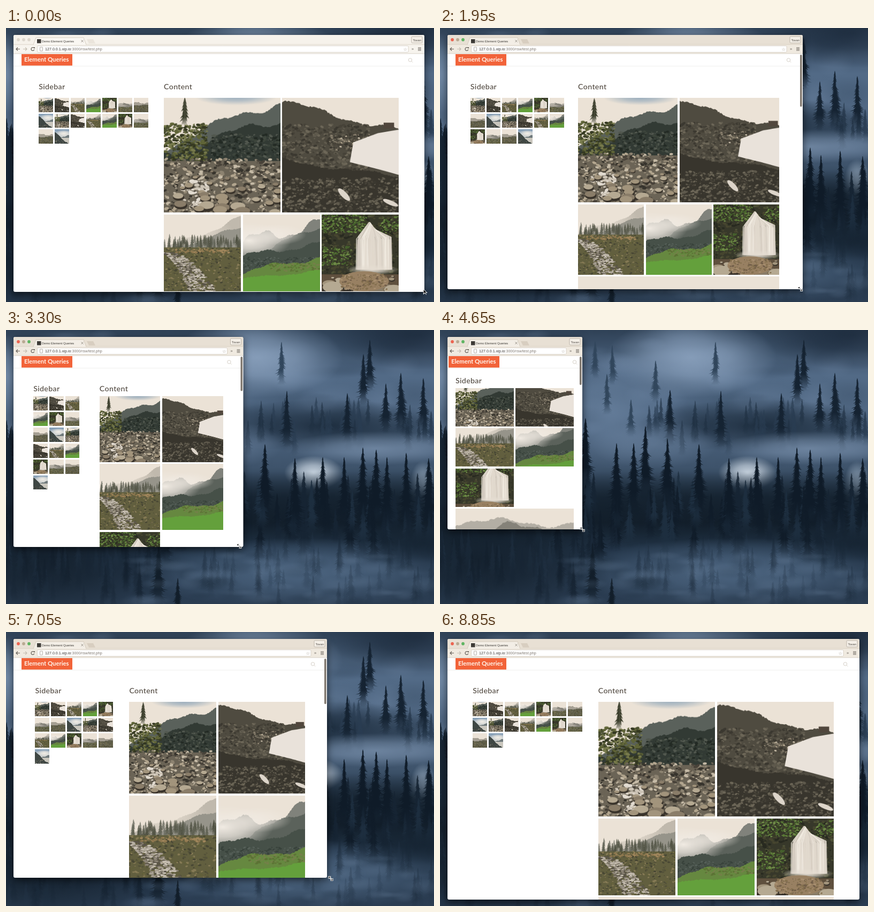
An HTML page with a canvas that plays this animation: 800 px wide and 514 px high, repeating every 9000 ms.

```html
<!DOCTYPE html>
<html lang="en">
<head>
<meta charset="utf-8">
<title>Element Queries</title>
<style>
html, body { margin: 0; width: 800px; height: 514px; overflow: hidden; background: #1b2a3a; }
canvas { display: block; }
</style>
</head>
<body>
<canvas id="stage" width="800" height="514"></canvas>
<script>
const ctx = document.getElementById('stage').getContext('2d');
const LOOP = 9000, STEP = 150;
const SANS = '"Liberation Sans", Arial, sans-serif', LATO = 'Lato, sans-serif';

let seed = 7;
const rnd = (a = 0, b = 1) => a + (b - a) * (seed = seed * 16807 % 2147483647) / 2147483647;
const pick = list => list[Math.floor(rnd(0, list.length))];

function offscreen(w, h, scale, paint) {
  const c = document.createElement('canvas');
  c.width = w;
  c.height = h;
  const g = c.getContext('2d');
  g.scale(scale, scale);
  paint(g);
  return c;
}

function rect(g, color, x, y, w, h) {
  g.fillStyle = color;
  g.fillRect(x, y, w, h);
}

function poly(g, color, ...p) {
  g.fillStyle = color;
  g.beginPath();
  for (let i = 0; i < p.length; i += 2) g.lineTo(p[i], p[i + 1]);
  g.fill();
}

function blob(g, color, x, y, rx, ry, turn = 0) {
  g.fillStyle = color;
  g.beginPath();
  g.ellipse(x, y, rx, ry, turn, 0, 7);
  g.fill();
}

function specks(g, colors, n, x0, y0, x1, y1, size) {
  for (let i = 0; i < n; i++) {
    const s = size * rnd(.3, 1);
    blob(g, pick(colors), rnd(x0, x1), rnd(y0, y1), s, s * .6, rnd(-.6, .6));
  }
}

function glow(g, color, x, y, rx, ry, alpha) {
  g.save();
  g.translate(x, y);
  g.scale(rx, ry);
  g.globalAlpha = alpha;
  const fill = g.createRadialGradient(0, 0, 0, 0, 0, 1);
  fill.addColorStop(0, color);
  fill.addColorStop(.45, color + 'b0');
  fill.addColorStop(1, color + '00');
  rect(g, fill, -1, -1, 2, 2);
  g.restore();
}

// Evenly spaced colours from top to bottom
function vertical(g, y, h, ...colors) {
  const fill = g.createLinearGradient(0, y, 0, y + h);
  colors.forEach((color, i) => fill.addColorStop(i / (colors.length - 1), color));
  return fill;
}

// A ragged fir whose foot dissolves into the mist
function fir(g, x, top, h, color) {
  g.fillStyle = vertical(g, top, h, color, color, color, color + '00');
  for (const side of [-1, 1]) {
    g.beginPath();
    g.moveTo(x, top);
    for (let y = 2; y < h; y += 3) {
      const reach = side * (.8 + .19 * Math.min(y, h * .7) * rnd(.35, 1.15));
      g.lineTo(x + reach, top + y + 1.5);
      g.lineTo(x + reach * .4, top + y);
    }
    g.lineTo(x, top + h);
    g.fill();
  }
}

function firs(g, n, x0, x1, top, spread, h, colors, alpha = 1) {
  g.globalAlpha = alpha;
  for (let i = 0; i < n; i++) {
    const size = rnd(.7, 1.2);
    fir(g, rnd(x0, x1), top + rnd(0, spread), h * size, pick(colors));
  }
  g.globalAlpha = 1;
}

const forest = offscreen(800, 514, 1, g => {
  const dark = ['#101c29', '#162433', '#1d2e3f'];
  const stand = (color, h, spots) => spots.forEach(([x, y]) => fir(g, x, y, h * rnd(.9, 1.1), color));
  rect(g, vertical(g, 0, 514, '#2f4156', '#526a86', '#4f6681', '#3e536b', '#1a2a39', '#24364a', '#2b3d52'), 0, 0, 800, 514);
  for (let i = 0; i < 90; i++)
    glow(g, pick(['#7088a6', '#31455b']), rnd(0, 800), rnd(0, 220), rnd(25, 80), rnd(12, 35), .25);
  glow(g, '#8da4c0', 470, 52, 160, 75, .85);
  glow(g, '#6d86a4', 320, 150, 110, 110, .65);
  glow(g, '#7890ac', 0, 85, 45, 75, .75);
  glow(g, '#1a2839', 770, 10, 170, 65, .8);
  stand('#31465c', 75, [[290, 20], [322, 28], [403, 57], [312, 82], [515, 22], [357, 130]]);

  glow(g, '#1c2c3d', 600, 180, 230, 50, .95);
  firs(g, 45, 390, 800, 125, 45, 60, ['#1f3042', '#293c51'], .7);
  stand('#152332', 105, [[680, 18], [668, 45], [738, 80], [710, 100], [780, 90], [525, 114], [638, 118], [430, 112]]);

  glow(g, '#7b92ae', 690, 222, 170, 32, .75);
  glow(g, '#6f87a4', 400, 215, 120, 45, .5);
  glow(g, '#c6d2de', 575, 268, 55, 32, 1);
  glow(g, '#a5b8cc', 780, 290, 25, 45, .8);

  rect(g, vertical(g, 265, 145, '#14212e00', '#14212ee0', '#121e2a', '#14212e00'), 0, 265, 800, 145);
  firs(g, 110, 0, 800, 255, 90, 95, dark);
  stand('#0f1b28', 140, [[272, 165], [330, 212], [362, 212], [384, 180], [425, 203], [484, 214], [540, 240],
    [592, 238], [632, 238], [667, 220], [692, 224], [712, 238], [748, 230], [790, 240]]);
  firs(g, 12, -2, 16, 165, 80, 120, dark);

  glow(g, '#506985', 550, 455, 320, 65, .9);
  glow(g, '#131f2b', 70, 430, 260, 120, .9);
  glow(g, '#152331', 780, 400, 130, 45, .8);
  firs(g, 90, 0, 800, 370, 110, 65, ['#162433', '#24364a'], .28);
  firs(g, 35, 0, 270, 375, 80, 75, dark, .4);
  stand('#121e2a', 125, [[285, 398], [321, 465]]);
  for (let i = 0; i < 60; i++)
    glow(g, pick(['#6a829e', '#1c2c3c']), rnd(250, 800), rnd(420, 514), rnd(15, 50), rnd(5, 16), .2);
});

const SKY = '#ebe2d6';
const STONE = ['#b3a68f', '#8d8371', '#49433a', '#6b6456', '#c6bba7', '#37342d'];
const ROCK = ['#3b3830', '#5f5a4d', '#464238', '#6d6758'];
const GRASS = ['#62603a', '#54523a', '#857a55', '#484734'];
const LEAF = ['#5a7a36', '#46602d', '#383c26', '#6f8a48'];

// Rough skyline from left to right, filled to the bottom
function ridge(g, color, left, right, bump = 3, phase = 0) {
  const p = [0, 100];
  for (let x = 0; x <= 100; x++)
    p.push(x, left + (right - left) * x / 100 - bump * Math.sin(x / 13 + phase)
      - bump * .35 * Math.sin(x / 4.3 + phase) + rnd(-.6, .6));
  poly(g, color, ...p, 100, 100);
}

function boulders(g, n, y0, size) {
  for (let i = 0; i < n; i++) {
    const u = (i + 1) / n, x = rnd(0, 100), y = y0 + (100 - y0) * u, r = size * u * rnd(.5, 1);
    blob(g, '#38322a', x + .5, y + r * .25, r, r * .6);
    blob(g, pick(['#a2947c', '#8a7d69', '#b5a992']), x, y, r * .92, r * .5);
  }
}

// Each scene is painted on a 100 by 100 field
const scenes = [
  g => { // boulders
    glow(g, '#8aa3b8', 62, 0, 35, 7, .8);
    ridge(g, '#5a615b', 42, 3, 4, 4);
    ridge(g, '#323a34', 48, 20, 4, 3);
    specks(g, ['#232a24', '#3d453c', '#52584f'], 260, 40, 32, 100, 52, 1.8);
    specks(g, ['#606538', '#4b5030', '#343821', '#777a4c'], 420, 0, 23, 37, 56, 2);
    fir(g, 18, 0, 26, '#3a3d2b');
    rect(g, '#6b6456', 0, 55, 100, 45);
    specks(g, STONE, 700, 0, 53, 100, 100, 2.2);
    specks(g, ['#e2dbd0', '#cdc4b6'], 60, 15, 72, 38, 95, 2.5);
    boulders(g, 45, 55, 9);
  },
  g => { // ridge with snow
    ridge(g, '#4f4b40', 4, 29, 2.5);
    specks(g, ROCK, 600, 0, 24, 75, 66, 2);
    specks(g, STONE, 150, 40, 32, 85, 46, 1.2);
    poly(g, '#e9e2da', 61, 39, 82, 31, 100, 28, 100, 67, 82, 62, 58, 56);
    ridge(g, '#38352d', 54, 69, 1.5, 2);
    specks(g, ROCK, 700, 0, 70, 100, 100, 1.8);
    blob(g, '#ddd5ca', 53, 84, 7, 2.5, .8);
    blob(g, '#ddd5ca', 93, 91, 7, 2, .4);
    rect(g, '#51473d', 87, 22, 9, 5);
  },
  g => { // brook in a valley
    ridge(g, '#c0b9ad', 46, 4);
    glow(g, SKY, 35, 22, 55, 22, .8);
    ridge(g, '#96948a', 48, 17, 2, 2);
    firs(g, 60, 0, 100, 25, 12, 17, ['#4a4c3d', '#66685c', '#555748'], .8);
    rect(g, '#625f3f', 0, 43, 100, 57);
    specks(g, GRASS, 500, 0, 43, 100, 100, 2);
    specks(g, ['#a0865c', '#8f7850'], 90, 15, 45, 85, 50, 2);
    for (let u = 0; u < 1; u += .003)
      blob(g, pick(['#aaa294', '#8d8577', '#c8c0b3', '#5a5449']), 50 * Math.sqrt(u) + rnd(-9, 9) * (1 + u), 50 + 50 * u, rnd(1, 3), 1);
  },
  g => { // green slope
    ridge(g, '#80827b', 36, 12, 8);
    ridge(g, '#5b625b', 58, 16, 3, 3);
    glow(g, '#f1ebe3', 8, 34, 55, 24, 1);
    glow(g, '#f1ebe3', 45, 26, 38, 14, .7);
    ridge(g, '#465048', 54, 38);
    specks(g, ['#38423b', '#566059', '#4a544c'], 350, 0, 56, 100, 72, 1.8);
    ridge(g, '#668840', 74, 56, 3, 5);
    specks(g, ['#5c7335', '#75804a'], 120, 35, 64, 100, 74, 2);
    ridge(g, '#64a03c', 84, 73, 1.5);
  },
  g => { // waterfall
    rect(g, '#37382a', 0, 0, 100, 100);
    specks(g, ['#282a20', '#46452f', '#4f5238'], 400, 0, 0, 100, 78, 3);
    specks(g, LEAF, 350, 0, 0, 58, 24, 2);
    specks(g, LEAF, 200, 0, 42, 38, 66, 2);
    specks(g, LEAF, 90, 76, 3, 100, 24, 2);
    for (let i = 0; i < 230; i++) {
      const u = rnd(), x = 62 + 8 * u + (u - .45) * 40 * rnd(.75, 1);
      const top = 28 + rnd(0, 6);
      poly(g, pick(['#f2ece3b0', '#e2d9ceb0', '#c9c0b370']), 61 + 7 * u, 10 + u * 10, 63 + 7 * u, 10 + u * 10, x + 1, top, x + 2, 72, x - 1, 72, x - .5, top);
    }
    glow(g, '#e5ddd2', 66, 72, 34, 7, 1);
    rect(g, '#5f503e', 0, 78, 100, 22);
    boulders(g, 25, 78, 20);
    blob(g, '#988062', 55, 87, 32, 13);
    specks(g, ['#84704f', '#a88f70', '#715e49'], 160, 25, 78, 85, 98, 2);
  },
  g => { // misty mountains
    ridge(g, '#b3aea4', 38, 40, 3, 5);
    ridge(g, '#858279', 45, 46, 6, 4);
    glow(g, SKY, 25, 55, 45, 10, .5);
    ridge(g, '#696a52', 66, 62);
    specks(g, GRASS, 350, 0, 68, 100, 100, 2.5);
  },
  g => { // hazy moor
    ridge(g, '#a59f93', 34, 37, 4);
    ridge(g, '#62614f', 54, 48, 2, 2);
    specks(g, GRASS, 350, 0, 57, 100, 100, 2.5);
  },
  g => { // lake under clouds
    rect(g, vertical(g, 0, 50, '#7f9ab4', '#c7cbca'), 0, 0, 100, 100);
    glow(g, '#f3eee6', 65, 28, 60, 25, 1);
    ridge(g, '#707a7c', 62, 42);
    rect(g, '#c9c6bd', 0, 58, 100, 42);
    ridge(g, '#3f4744', 18, 105, 4);
    specks(g, STONE, 90, 0, 75, 60, 100, 2);
  }
];
const photos = scenes.map(paint => offscreen(240, 240, 2.4, g => {
  rect(g, SKY, 0, 0, 100, 100);
  paint(g);
}));

// Crops the picture to cover its box
function photo(i, x, y, w, h) {
  const size = 240 / Math.max(w, h), sw = w * size, sh = h * size;
  ctx.drawImage(photos[i % 8], (240 - sw) / 2, (240 - sh) / 2, sw, sh, x, y, w, h);
}

function thumbs(x, y, width) {
  const cols = Math.max(1, Math.floor((width + 3) / 29.7));
  for (let i = 0; i < 16; i++)
    photo(i, x + i % cols * 29.7, y + Math.floor(i / cols) * 29.7, 26.7, 26.7);
}

function gallery(x, y, width, stacked) {
  const gap = 3.7, half = (width - gap) / 2;
  const h = stacked ? half * .66 : Math.min(half + 10, 215);
  const rows = width > 350 ? [[0, 1], [2, 3, 4], [5]] : [[0, 1], [2, 3], [4], [5]];
  for (const row of rows) {
    const cols = row[0] === 5 ? 1 : Math.max(2, row.length);
    const w = (width - gap * (cols - 1)) / cols, rowHeight = cols === 3 ? h * .67 : h * (cols === 1 ? 1.4 : 1);
    row.forEach((p, i) => photo(p, x + i * (w + gap), y, w, rowHeight));
    y += rowHeight + gap;
  }
}

function text(str, x, y, font, color, spacing = 0) {
  ctx.font = font;
  ctx.fillStyle = color;
  ctx.letterSpacing = spacing + 'px';
  ctx.fillText(str, x, y);
  return ctx.measureText(str).width;
}

function line(color, width, ...p) {
  ctx.strokeStyle = color;
  ctx.lineWidth = width;
  ctx.beginPath();
  for (let i = 0; i < p.length; i += 2) ctx.lineTo(p[i], p[i + 1]);
  ctx.stroke();
}

function box(fill, stroke, x, y, w, h, radius) {
  ctx.beginPath();
  ctx.roundRect(x, y, w, h, radius);
  ctx.fillStyle = fill;
  ctx.fill();
  if (!stroke) return;
  ctx.strokeStyle = stroke;
  ctx.lineWidth = .7;
  ctx.stroke();
}

function ring(color, width, x, y, r, from = 0, to = 7) {
  ctx.strokeStyle = color;
  ctx.lineWidth = width;
  ctx.beginPath();
  ctx.arc(x, y, r, from, to);
  ctx.stroke();
}

function arrow(color, tip, dir) {
  line(color, 1.2, tip, 39.5, tip - 7 * dir, 39.5);
  line(color, 1.2, tip - 3 * dir, 36.5, tip, 39.5, tip - 3 * dir, 42.5);
}

// Time, then the right and bottom edge of the window
const keys = [
  [0, 782, 495], [1950, 678, 490], [3300, 443.5, 407], [4650, 266, 374],
  [5850, 345, 394], [7050, 600, 461], [8850, 784, 502]
];

// Monotone cubic through the keys
function track(t, col) {
  const last = keys.length - 1;
  if (t >= keys[last][0]) return keys[last][col];
  const slope = i => (keys[i + 1][col] - keys[i][col]) / (keys[i + 1][0] - keys[i][0]);
  const tangent = i => {
    if (i === 0 || i === last) return 0;
    const a = slope(i - 1), b = slope(i);
    return a * b <= 0 ? 0 : 2 * a * b / (a + b);
  };
  const i = keys.findIndex((k, n) => t < keys[n + 1][0]);
  const d = keys[i + 1][0] - keys[i][0], u = (t - keys[i][0]) / d, v = 1 - u;
  return v * v * (1 + 2 * u) * keys[i][col] + u * u * (3 - 2 * u) * keys[i + 1][col]
    + d * u * v * (v * tangent(i) - u * tangent(i + 1));
}

function chrome(right, active) {
  rect(ctx, active ? '#e8e0d4' : '#f6f2eb', 14, 13, right - 14, 18);
  rect(ctx, active ? '#f0eae0' : '#f7f4ee', 14, 31, right - 14, 17);
  line('#d0c6b8', .7, 14, 31, right, 31);
  line('#cfc7bb', .8, 14, 48, right, 48);
  ['#ec6350', '#b8aa92', '#5fb562'].forEach((color, i) => blob(ctx, active ? color : '#ddd7cd', 23 + i * 10, 22, 2.9, 2.9));

  const tab = [51, 31.5, 56, 18, 145, 18, 150, 31.5];
  poly(ctx, active ? '#f3eee6' : '#faf7f2', ...tab);
  line('#c9bfb1', .7, ...tab);
  poly(ctx, active ? '#d8cec0' : '#ebe5dc', 151, 21, 163, 21, 167, 29, 155, 29);
  rect(ctx, '#3d3a36', 58, 21, 7.5, 7.5);
  text('Demo Element Queries', 67, 27, '5.8px ' + SANS, '#3d3a36');
  line('#807970', .9, 140.5, 22.5, 144.5, 26.5);
  line('#807970', .9, 144.5, 22.5, 140.5, 26.5);
  box('#f4efe7', '#aaa196', right - 24, 16, 20, 12, 1.5);
  text('Tovan', right - 21.5, 24.5, '5.8px ' + SANS, '#4a4540');

  arrow('#67615a', 19, -1);
  arrow('#c5bdb2', 39, 1);
  ring('#67615a', 1.2, 50, 39.5, 3, .3, 5.6);
  poly(ctx, '#67615a', 51, 36, 54, 36, 54, 39);
  box('#fff', '#cfc6ba', 58.5, 33.5, right - 88.5, 12, 1.5);
  box('#fff', '#948c82', 63.5, 36, 5, 7, .5);
  const w = text('127.0.0.1.xip.io', 73, 42.2, '7.15px ' + SANS, '#35322f');
  text(':3000/rsw/test.php', 73 + w, 42.2, '7.15px ' + SANS, '#807a73');
  text('☆', right - 39.5, 42.6, '8.5px "DejaVu Sans", sans-serif', '#a69d91');
  text('»', right - 24, 42, '7.5px ' + SANS, '#67615a');
  for (const y of [37, 39.5, 42]) line('#5d5750', 1.2, right - 12, y, right - 6, y);
}

function page(right, bottom, resizing) {
  const W = right - 14, stacked = W < 290, compact = W < 385;
  const logoX = stacked ? 16 : 29, icon = right - (stacked ? 14.5 : 26.5);
  rect(ctx, '#f26339', logoX, 49, 95, 21.5);
  text('Element Queries', logoX + 5, 63.3, '700 11.3px ' + LATO, '#fff3ea');
  line('#efefed', 1, 14, 71.5, right, 71.5);
  ring('#d5cfc6', 1, icon, 60, 3.2);
  line('#d5cfc6', 1, icon + 2.5, 62.5, icon + 4.5, 64.5);

  const margin = stacked ? 15 : compact ? 21 : 35 + (W / 334) ** 3;
  const top = compact ? 109 : W < 500 ? 124 : 131, left = 14 + margin;
  const title = (str, x) => text(str, x, compact ? 99.5 : 114.5, '500 14.2px ' + LATO, '#514940', .35);
  title('Sidebar', left);
  if (stacked) {
    gallery(left, top, W - 31, true);
  } else {
    const x = (compact ? 18 : 22.4) + .355 * W, width = right - margin - .7 - x;
    thumbs(left, top, x - left - 12);
    title('Content', x);
    if (compact) thumbs(x, top, width);
    else gallery(x, top, width);
  }
  if (resizing && (stacked || !compact))
    box('#817970', null, right - 5, 50, 3.6, (bottom - 48) ** 2 / 2000, 1.8);
}

function pointer(x, y, resizing) {
  ctx.save();
  ctx.translate(x, y);
  if (resizing) {
    for (const [color, r, cut] of [['#fff', 4.5, -1], ['#222', 3.6, .4]]) {
      line(color, r - cut - 2.5, -2, -2, 2, 2);
      for (const s of [-1, 1]) poly(ctx, color, s * r, s * r, s * cut, s * r, s * r, s * cut);
    }
  } else {
    poly(ctx, '#fff', -2, -6, -2, 5, 1, 2.5, 4, 6, 3, 2, 6, 2);
    poly(ctx, '#111', -1.2, -4, -1.2, 3, 1, 1.2, 3.4, 4.3, 2.2, 1, 4, 1);
  }
  ctx.restore();
}

function draw(t) {
  const right = track(t, 1), bottom = track(t, 2);
  const active = t > 0, dragging = t < 8500;
  const outline = () => {
    ctx.beginPath();
    ctx.roundRect(14, 13, right - 14, bottom - 13, 3);
  };
  ctx.drawImage(forest, 0, 0);
  ctx.save();
  ctx.shadowColor = 'rgba(0,0,0,.6)';
  ctx.shadowBlur = 14;
  ctx.shadowOffsetY = 4;
  ctx.fillStyle = '#fff';
  outline();
  ctx.fill();
  ctx.restore();
  ctx.save();
  outline();
  ctx.clip();
  chrome(right, active);
  page(right, bottom, active && dragging);
  ctx.restore();
  // The pointer leads the window corner it drags
  if (dragging) pointer(track(t + 50, 1), track(t + 50, 2), active);
}

const start = performance.now();
function tick() {
  const t = (performance.now() - start) % LOOP;
  draw(Math.floor(t / STEP) * STEP);
  requestAnimationFrame(tick);
}
tick();
</script>
</body>
</html>
```
